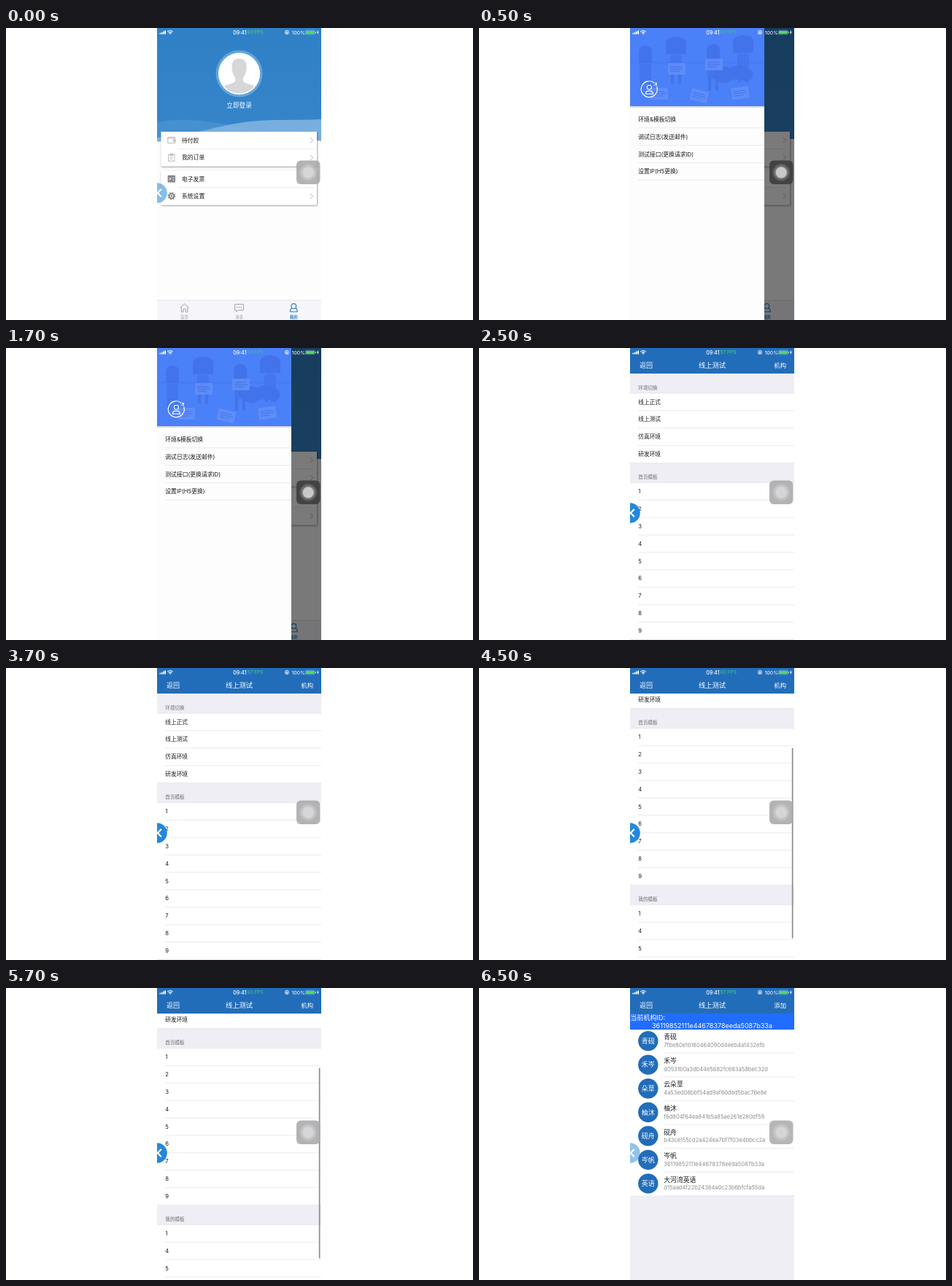
Animation of 640 by 400 pixels, one loop 8000 ms. Source, as an HTML page:

```html
<!DOCTYPE html>
<html lang="zh-CN">
<head>
<meta charset="utf-8">
<style>
html, body { margin: 0; width: 100%; height: 100%; overflow: hidden; background: #fff; }
svg { display: block; width: 640px; height: 400px; }
text { font-family: Inter, "Noto Sans CJK SC", "Noto Sans CJK", sans-serif; dominant-baseline: alphabetic; }
</style>
</head>
<body>
<svg id="stage" viewBox="0 0 640 400" xmlns="http://www.w3.org/2000/svg"></svg>
<script>
const LEFT = 207, RIGHT = 432, WIDTH = RIGHT - LEFT, ROW = 23.87;
const NAV = '#226db9', PALE = '#efeef4';

const rect = (x, y, w, h, fill, more = '') =>
  `<rect x="${x}" y="${y}" width="${w}" height="${h}" fill="${fill}" ${more}/>`;
const circle = (x, y, r, fill, more = '') =>
  `<circle cx="${x}" cy="${y}" r="${r}" fill="${fill}" ${more}/>`;
const path = (d, fill, more = '') => `<path d="${d}" fill="${fill}" ${more}/>`;
const stroke = (d, color, width = 1, more = '') =>
  path(d, 'none', `stroke="${color}" stroke-width="${width}" ${more}`);
// y is the vertical middle of the glyphs
const text = (s, x, y, size, fill = '#1c1c1e', more = '') =>
  `<text x="${x}" y="${y + size * 0.37}" font-size="${size}" fill="${fill}" ${more}>${s.replace('&', '&amp;')}</text>`;
const centred = (s, x, y, size, fill, more = '') =>
  text(s, x, y, size, fill, 'text-anchor="middle" ' + more);
const line = (x1, x2, y, color = '#dedee2') => stroke(`M${x1} ${y}H${x2}`, color, 0.6);

function statusBar(fps, green) {
  let out = '';
  for (let i = 0; i < 4; i++) out += rect(210.5 + i * 2.3, 6.8 - i * 1.1, 1.7, 1.7 + i * 1.1, '#fff', 'rx=".3"');
  out += stroke('M221.3 5.1Q225 1.9 228.7 5.1M222.7 6.6Q225 4.6 227.3 6.6', '#fff', 1.1);
  out += path('M223.7 7.5Q225 6.6 226.3 7.5L225 8.9Z', '#fff');
  out += text('09:41', 311.3, 6, 7, '#fff', 'font-weight="500"');
  out += text(fps + ' FPS', 330.6, 6, 6.6, green);
  out += circle(385, 6, 2.7, 'none', 'stroke="#fff" stroke-width=".7"');
  out += rect(383.8, 5.5, 2.4, 1.9, '#fff') + stroke('M384.3 5.6V4.7Q385 3.8 385.7 4.7V5.6', '#fff', 0.5);
  out += text('100%', 391.8, 6, 6.8, '#fff');
  out += rect(410.3, 3.2, 13, 5.6, 'none', 'rx="1.3" stroke="#fff" stroke-opacity=".6" stroke-width=".5"');
  out += rect(411, 3.9, 11.6, 4.2, '#4cd964', 'rx=".8"') + rect(423.8, 5, 0.8, 2, '#fff');
  return out + path('M427.9 2.8L425.9 6.3H427.1L426.6 9.2L428.7 5.5H427.5Z', '#fff');
}

const assistive = (fill, opacity, core) =>
  rect(398, 181.5, 32.5, 32.5, fill, `rx="6" opacity="${opacity}"`) +
  circle(414.2, 197.8, 12, '#fff', 'opacity=".12"') +
  circle(414.2, 197.8, 9.8, '#fff', 'opacity=".18"') +
  circle(414.2, 197.8, 7.6, core);

const sideTab = opacity =>
  `<g opacity="${opacity}">${circle(207, 226, 13.8, '#2388dc')}</g>` +
  stroke('M212.8 220.8L207.8 226L212.8 231.2', '#fff', 2.2);

const chevron = y => stroke(`M417 ${y - 3.6}L420.6 ${y}L417 ${y + 3.6}`, '#b5b5b8', 1);

function card(y, labels) {
  let out = rect(212.5, y, 213.5, 47.3, '#fff', 'filter="url(#shade)"') + line(236, 422, y + 23.7);
  labels.forEach((s, i) => {
    const mid = y + 11.8 + i * 23.8;
    out += text(s, 241, mid, 7.8) + chevron(mid);
  });
  return out;
}

function menuIcons() {
  const grey = '#a9a9ad', dark = '#85858a';
  let out = stroke('M221.8 149.6H231.6V157.8H221.8ZM221.8 151.2H231.6M229 153.3H232V155.4H229Z', grey, 0.8);
  out += stroke('M222.6 173.4H231V182.2H222.6ZM225 172.3H228.6V174.4H225ZM224.6 177H229M224.6 179.4H228', grey, 0.8);
  out += rect(221.6, 201.8, 10.4, 9.6, dark, 'rx="1"');
  out += stroke('M223.6 204.8L226 208.4M226 204.8L223.6 208.4M228 205H230.5M228 208H230.5', '#fff', 0.8);
  out += circle(227, 230.2, 3.3, 'none', `stroke="${dark}" stroke-width="2"`);
  out += circle(227, 230.2, 4.8, 'none', `stroke="${dark}" stroke-width="1.2" stroke-dasharray="1.9 1.87"`);
  return out + circle(227, 230.2, 1.2, dark);
}

function tabBar() {
  const grey = '#9a9a9e', blue = '#2c80c4';
  let out = rect(LEFT, 373, WIDTH, 27, '#f6f6fa') + line(LEFT, RIGHT, 373, '#d4d4da');
  out += stroke('M238.8 383.4L244.6 377.8L250.4 383.4M240.3 382.4V389H243V385H246.2V389H248.9V382.4', grey, 0.9);
  out += stroke('M313.6 378.4H325.4V386.6H318L315.8 388.8V386.6H313.6Z', grey, 0.9);
  for (const x of [316.8, 319.5, 322.2]) out += circle(x, 382.5, 0.8, grey);
  out += circle(394.3, 381, 3.4, 'none', `stroke="${blue}" stroke-width="1.1"`);
  out += stroke('M391.9 383.6Q389.2 385 389.4 388.7H399.2Q399.4 385 396.7 383.6', blue, 1.1);
  out += centred('首页', 244.6, 395.8, 5.5, grey) + centred('消息', 319.4, 395.8, 5.5, grey);
  return out + centred('我的', 394.2, 395.8, 5.5, blue, 'font-weight="700"');
}

function home(waves) {
  let out = rect(LEFT, 0, WIDTH, 400, '#fdfdfe') + rect(LEFT, 0, WIDTH, 152, 'url(#sky)') + waves;
  out += circle(319.6, 62.6, 32, '#75b0e2', 'opacity=".75"') + circle(319.6, 62.6, 28.6, '#fff');
  out += `<g clip-path="url(#face)">` + path('M309.5 53Q309.5 42 319.6 42Q329.7 42 329.7 53Q329.5 63 325 68V73Q328 76 337 78Q343 80 344 92H295Q296 80 302 78Q311 76 314.2 73V68Q309.7 63 309.5 53Z', '#d7d7d9') + '</g>';
  out += centred('立即登录', 319.6, 106, 8.7, '#fff');
  out += card(142, ['待付款', '我的订单']) + card(195, ['电子发票', '系统设置']);
  return out + menuIcons() + tabBar();
}

const swell =
  path('M207 129Q240 123 275 128T345 140T432 134V155H207Z', '#4b94d3', 'opacity=".8"') +
  path('M207 150Q250 146 290 136T370 126T432 125V154Q420 158 400 156H207Z', '#83b6e1', 'opacity=".85"') +
  path('M207 156Q260 152 320 148T432 155V160H207Z', '#fdfdfe');
const ebb = path('M385 150H432V152Q420 149 410 152T385 152Z', '#3382c8');

function crowd() {
  const body = '#4373ea', paper = '#6592fa';
  let out = rect(LEFT, 46, 184, 3, body, 'opacity=".35"');
  [[228, 24], [270, 12], [321, 22], [362, 10]].forEach(([x, y], i) => {
    const w = i % 2 ? 14 : 9;
    out += path(`M${x - w} ${y + 24}V${y + 10}Q${x - w} ${y} ${x} ${y}T${x + w} ${y + 10}V${y + 24}Z`, body);
    out += rect(x - 8, y + 25, 16, 23, body, 'rx="4" opacity=".75"');
    out += stroke(`M${x - 5} ${y + 46}V${y + 64}M${x + 5} ${y + 46}V${y + 64}`, body, 4);
  });
  out += path('M318 62Q326 49 344 54Q360 46 375 60Q378 70 366 74Q352 66 340 75Q325 76 318 62Z', body);
  [[271, 56, 0], [302, 93, 14], [358, 89, -8], [247, 90, 0], [322, 50, 0]].forEach(([x, y, turn]) => {
    out += `<g transform="translate(${x} ${y}) rotate(${turn})">` + rect(-12, -8, 24, 16, paper, 'rx="1.5" opacity=".75"') +
      stroke('M-9 -3H7M-9 0H9M-9 3H4', body, 1) + '</g>';
  });
  return out;
}

function drawer() {
  let out = home(ebb) + rect(LEFT, 0, WIDTH, 400, '#000', 'opacity=".52"');
  out += rect(LEFT, 0, 184, 400, '#fdfdfe') + rect(LEFT, 107, 184, 3, 'url(#fall)');
  out += `<g clip-path="url(#banner)">${rect(LEFT, 0, 184, 107, '#4a80f8')}${crowd()}</g>`;
  out += stroke('M240.3 75.3A11 11 0 1 0 243.8 80.5', '#fff', 1.2);
  out += stroke('M239.8 78.6L243.3 76.2L242.8 80M241 75.6H244', '#fff', 1);
  out += circle(233.4, 81.2, 3, 'none', 'stroke="#fff" stroke-width="1.1"');
  out += stroke('M228.3 90.3Q228.5 86.4 231.5 86.4H235.3Q238.3 86.4 238.5 90.3Z', '#fff', 1.1);
  ['环境&模板切换', '调试日志(发送邮件)', '测试接口(更换请求ID)', '设置IP(H5更换)'].forEach((s, i) => {
    out += text(s, 218.3, 125 + i * ROW, 7.8) + line(218, 391, 136.8 + i * ROW);
  });
  return out + statusBar(60, '#45c08a') + assistive('#3f3d40', 0.92, '#c9c8c9');
}

const navBar = action =>
  rect(LEFT, 0, WIDTH, 35, NAV) + text('返回', 220, 23.4, 9.1, '#fff') +
  centred('线上测试', 319.5, 23.4, 9.3, '#fff') + text(action, 404.3, 23.4, 8.4, '#fff');

const sections = [
  ['环境切换', ['线上正式', '线上测试', '仿真环境', '研发环境']],
  ['首页模板', [...'123456789']],
  ['我的模板', [...'1456']]
];

function settings(scroll, fps, green) {
  let y = 35 - scroll, out = rect(LEFT, 0, WIDTH, 400, PALE);
  for (const [title, rows] of sections) {
    out += text(title, 218.3, y + 19.4, 6.6, '#6d6d72');
    y += 27;
    out += rect(LEFT, y, WIDTH, rows.length * ROW, '#fff') + line(LEFT, RIGHT, y);
    rows.forEach((s, i) => {
      out += text(s, 218.3, y + 11.7, 7.7);
      y += ROW;
      out += line(i < rows.length - 1 ? 218 : LEFT, RIGHT, y);
    });
  }
  if (scroll) out += rect(428.8, 109.5, 1.7, 261, '#8c8c8e', 'rx=".8"');
  return out + navBar('机构') + statusBar(fps, green) + sideTab(1) + assistive('#a9a8aa', 0.88, '#d6d5d6');
}

const groups = [
  ['青砚', '7fbe80e1b180464090d4eeb4a1432efb'],
  ['禾岑', 'd0531b0a3db44e5682fc663a58bec32d'],
  ['云朵草', '4a53ed08bbf54ad9af60ded5bac76e8e'],
  ['柚沐', 'f6d804f64ea841b5a85ae261e280df59'],
  ['砚舟', 'b43ce155cd2a424ea7bf7f03e4bbcc2a'],
  ['岑帆', '36119852111e44678378eeda5087b33a'],
  ['大河湾英语', 'd15aad4f22b24384a0c23b6bfcfa55da']
];

function directory() {
  let out = rect(LEFT, 0, WIDTH, 400, PALE) + navBar('添加') + rect(LEFT, 35, WIDTH, 22, '#216dff');
  out += text('当前机构ID:', 207.5, 41, 9, '#fff') + centred(groups[5][1], 319.5, 51.5, 9, '#fff');
  out += rect(LEFT, 57, WIDTH, 227.5, '#fff');
  groups.forEach(([name, id], i) => {
    const y = 72.6 + i * 32.55;
    out += circle(231.8, y, 13.7, NAV) + centred(name.slice(-2), 231.8, y, 9, '#fff');
    out += text(name, 253.3, y - 5.5, 8.8) + text(id, 253.3, y + 5.8, 7.53, '#8e8e92');
    out += line(253, RIGHT, y + 16.6);
  });
  return out + statusBar(57, '#4cd964') + sideTab(0.5) + assistive('#b0afb1', 0.92, '#d6d5d6');
}

const defs = `<defs>
  <linearGradient id="sky" x2="0" y2="1"><stop stop-color="#3080c6"/><stop offset="1" stop-color="#3685ca"/></linearGradient>
  <linearGradient id="fall" x2="0" y2="1"><stop stop-color="#c4c6cc"/><stop offset="1" stop-color="#fdfdfe"/></linearGradient>
  <clipPath id="phone">${rect(LEFT, 0, WIDTH, 400, '#000')}</clipPath>
  <clipPath id="banner">${rect(LEFT, 0, 184, 107, '#000')}</clipPath>
  <clipPath id="face">${circle(319.6, 62.6, 27, '#000')}</clipPath>
  <filter id="shade" x="-5%" y="-10%" width="110%" height="130%">
    <feDropShadow dx=".5" dy="1" stdDeviation="1" flood-opacity=".5"/></filter>
</defs>`;

const scenes = [
  [0, home(swell) + statusBar(60, '#4cd964') + sideTab(0.55) + assistive('#a9a8aa', 0.88, '#d6d5d6')],
  [500, drawer()],
  [2500, settings(0, 57, '#4cd964')],
  [4500, settings(102, 60, '#46c47c')],
  [6500, directory()]
];

const stage = document.getElementById('stage');
stage.innerHTML = defs + `<g clip-path="url(#phone)">${scenes.map(s => `<g class="scene">${s[1]}</g>`).join('')}</g>`;
const layers = [...stage.querySelectorAll('.scene')];

const begin = performance.now();
function draw() {
  const t = (performance.now() - begin) % 8000;
  const shown = scenes.findLastIndex(s => t >= s[0]);
  layers.forEach((g, i) => g.style.display = i === shown ? '' : 'none');
  requestAnimationFrame(draw);
}
draw();
</script>
</body>
</html>
```
